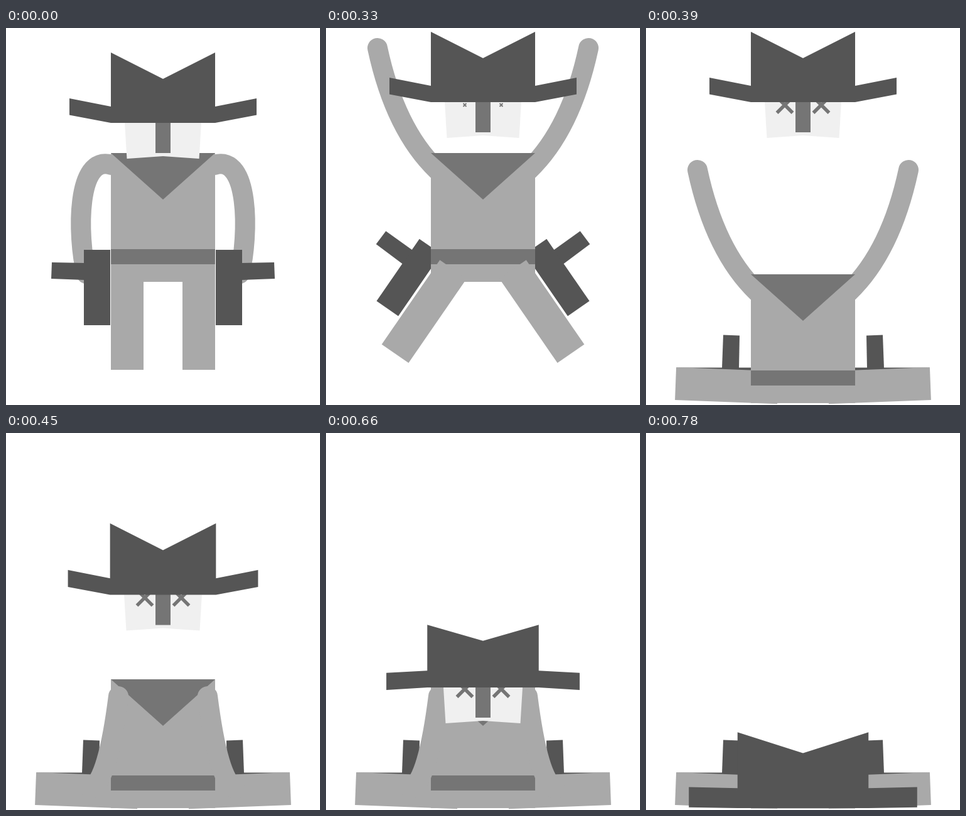
Animation of 500 by 600 pixels, one loop 3.78 s. Source, as an HTML page with a canvas:

```html
<!DOCTYPE html>
<html lang="en">
<head>
<meta charset="utf-8">
<title>Cowboy drop</title>
<style>
  html, body { margin: 0; width: 100%; height: 100%; overflow: hidden; background: #fff; }
  canvas { display: block; width: 500px; height: 600px; }
</style>
</head>
<body>
<canvas id="stage" width="500" height="600"></canvas>
<script>
const LOOP = 3780, STEP = 30, CX = 250, FLOOR = 598;
const DARK = '#555', MID = '#757575', BODY = '#a9a9a9', SKIN = '#f0f0f0';
const ctx = document.getElementById('stage').getContext('2d');

// Arm curves from shoulder to hand.
const HANGING = [[168, 218], [112, 200], [113, 330], [128, 391]];
const RAISED = [[177, 226], [128, 179], [99, 111], [82, 32]];
const LOWERED = [[179, 419], [168, 506], [154, 556], [135, 567]];

const ramp = (t, from, to) => Math.min(1, Math.max(0, (t - from) / (to - from)));
const mix = (a, b, k) => a + (b - a) * k;

// Progress of every phase of the gag, each from 0 to 1.
const phases = t => ({
  jump: t < 30 ? 0 : 1,
  eyes: ramp(t, 315, 390),
  sink: ramp(t, 330, 390),
  swing: ramp(t, 390, 450),
  drop: ramp(t, 390, 510) ** 1.04,
  land: ramp(t, 450, 510),
  crush: ramp(t, 660, 780)
});

function poly(color, ...pts) {
  ctx.fillStyle = color;
  ctx.beginPath();
  for (const [x, y] of pts) ctx.lineTo(x, y);
  ctx.fill();
}

// Polygon closed by its reflection in the vertical axis x = 0.
function symmetric(color, ...half) {
  poly(color, ...half, ...half.map(([x, y]) => [-x, y]).reverse());
}

function rect(color, x, y, w, h) {
  ctx.fillStyle = color;
  ctx.fillRect(x, y, w, h);
}

function saved(draw) {
  ctx.save();
  draw();
  ctx.restore();
}

function bothSides(draw) {
  saved(draw);
  saved(() => {
    ctx.translate(2 * CX, 0);
    ctx.scale(-1, 1);
    draw();
  });
}

function pivot(x, y, deg) {
  ctx.translate(x, y);
  ctx.rotate(deg * Math.PI / 180);
}

function flatten(crush) {
  const s = 1 - 0.65 * crush;
  ctx.translate(0, FLOOR * (1 - s));
  ctx.scale(1, s);
}

function arms({ jump, sink, swing, crush }) {
  const start = jump ? RAISED : HANGING;
  const [shoulder, a, b, hand] = start.map(([x, y], i) => [
    mix(x, LOWERED[i][0], swing),
    mix(y + 194 * sink, LOWERED[i][1], swing)
  ]);
  ctx.strokeStyle = BODY;
  ctx.lineWidth = 32;
  ctx.lineCap = 'round';
  bothSides(() => {
    flatten(crush);
    ctx.beginPath();
    ctx.moveTo(...shoulder);
    ctx.bezierCurveTo(...a, ...b, ...hand);
    ctx.stroke();
  });
}

function guns({ jump, sink }) {
  bothSides(() => {
    pivot(164 - 26 * sink, 384 + 196.5 * sink, mix(34.6 * jump, 90, sink));
    rect(DARK, -40, -31, 42, 120);
    poly(DARK, [-91, -11], [-39, -10], [-39, 17], [-92, 15]);
  });
}

function legs({ jump, sink }) {
  bothSides(() => {
    pivot(193, 398 + 173.6 * sink, mix(34.6 * jump, 92.2, sink));
    rect(BODY, -26, -17, 52, 163);
  });
}

function torso({ sink, crush }) {
  saved(() => {
    flatten(crush);
    ctx.translate(0, 193 * sink);
    rect(BODY, 167, 199, 166, 205);
    poly(MID, [167, 199], [333, 199], [250, 273]);
    rect(MID, 167, 352, 166, 24);
  });
}

function face(size, { eyes, land, crush }) {
  const w = 61 * size, r = 12.5 * eyes, y = 4.5 - 2 * land;
  saved(() => {
    ctx.scale(1, 1 - crush);
    symmetric(SKIN, [0, 53], [w - 3.5, 57], [w, 0]);
    rect(MID, -12, -2, 24, 50);
    ctx.strokeStyle = MID;
    ctx.lineCap = 'butt';
    ctx.lineWidth = 1 + 4.5 * eyes;
    ctx.beginPath();
    for (const x of [-29, 29]) {
      for (const d of [-r, r]) {
        ctx.moveTo(x - d, y - r);
        ctx.lineTo(x + d, y + r);
      }
    }
    if (eyes) ctx.stroke();
  });
}

function hat(size, { land, crush }) {
  const w = 83 * size + 3 * land;
  const brim = 149 * size;
  const tip = 17 * land - 39 * size - 3 * crush;
  symmetric(DARK,
    [0, -70 * size - 2 * land], [w, 16 * land - 112 * size], [w, -26 * size],
    [brim, tip], [brim, tip + 26.5 * size], [w, 0]);
}

function head(p) {
  const size = 1 + 0.033 * p.drop + 0.187 * p.crush;
  saved(() => {
    ctx.translate(CX, 151 - 33 * p.jump + 287 * p.drop + 192 * p.crush);
    face(size, p);
    hat(size, p);
  });
}

function draw(t) {
  const p = phases(t);
  rect('#fff', 0, 0, 500, 600);
  // Legs slip behind the torso on the way down; arms end up in front of it.
  const layers = p.sink ? [guns, legs, torso] : [guns, torso, legs];
  if (p.swing) layers.push(arms);
  else layers.unshift(arms);
  for (const layer of [...layers, head]) layer(p);
}

let start;
function tick(now) {
  start ??= now;
  const t = (now - start) % LOOP;
  draw(Math.floor(t / STEP) * STEP);
  requestAnimationFrame(tick);
}
draw(0);
requestAnimationFrame(tick);
</script>
</body>
</html>
```
